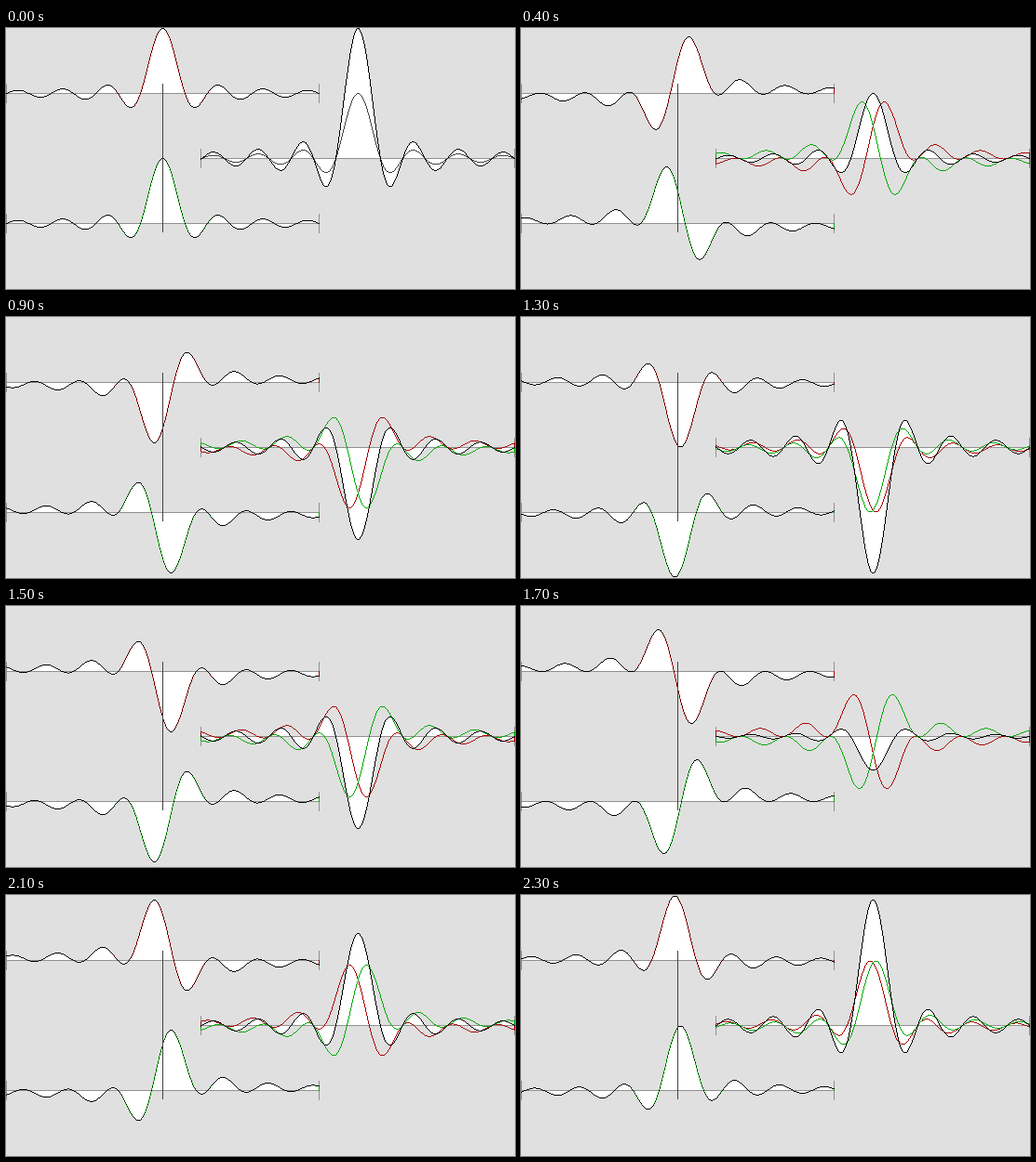
A matplotlib script for the animation above (2.4 s loop, 547 by 281 pixels).

```python
import numpy as np
import matplotlib.pyplot as plt
from matplotlib.animation import FuncAnimation
from matplotlib.collections import LineCollection

W, H, DPI = 547, 281, 64
FRAMES, INTERVAL = 24, 100
HALF, AMP = 168, 70
PIXEL = 72 / DPI

RED, GREEN, BLACK = "#aa0000", "#00aa00", "#000000"
MERGED = MARKER = "#404040"
AXIS = "#909090"

fig = plt.figure(figsize=(W / DPI, H / DPI), dpi=DPI, facecolor="#e0e0e0")
ax = fig.add_axes([0, 0, 1, 1])
ax.set_xlim(-0.5, W - 0.5)
ax.set_ylim(H - 0.5, -0.5)
ax.axis("off")

cols = np.arange(-1, 2 * HALF + 1)
u = 7 * np.pi * (cols - HALF) / HALF


def packet(phase):
    """Flat band of waves, all turned by the same phase."""
    even = np.sinc(u / np.pi)
    odd = np.sin(u / 2) * np.sinc(u / (2 * np.pi))
    return AMP * (np.cos(phase) * even + np.sin(phase) * odd)


def bars(x, a, b):
    """One-pixel-wide columns covering rows a to b inclusive."""
    x, a, b = np.broadcast_arrays(x, a, b)
    top, bottom = np.minimum(a, b) - 0.5, np.maximum(a, b) + 0.5
    return np.stack([np.column_stack([x, top]),
                     np.column_stack([x, bottom])], axis=1)


def layer(color, z):
    coll = LineCollection([], colors=color, linewidths=PIXEL, zorder=z,
                          antialiaseds=False, capstyle="butt")
    coll.set_snap(False)
    ax.add_collection(coll, autolim=False)
    return coll


class Panel:
    def __init__(self, x0, y0):
        self.x, self.y0 = cols + x0, y0
        self.body = layer("white", 1)
        left, right = max(x0 - 1, 0), x0 + 2 * HALF
        axis = layer(AXIS, 2)
        ticks = bars(np.array([left, right]), y0 - 10, y0 + 10)
        line = [[(left - 0.5, y0), (right + 0.5, y0)]]
        axis.set_segments(list(ticks) + line)

    def rows(self, wave):
        return self.y0 - np.round(wave)

    def fill(self, wave):
        self.body.set_segments(bars(self.x, self.y0, self.rows(wave)))

    def stroke(self, coll, wave):
        """Thin pixel line: neighbouring columns share out the rows between."""
        y = self.rows(wave)
        dy = np.diff(y)
        step, reach = np.sign(dy), np.abs(dy) // 2
        ends = y[:-1] + step * reach
        coll.set_segments(bars(self.x, np.r_[self.y0, ends + step],
                               np.r_[ends, self.y0]))

    def dots(self, coll, wave):
        y = self.rows(wave)
        coll.set_segments(bars(self.x, y, y))


upper, lower, total = Panel(0, 70), Panel(0, 210), Panel(210, 140)
sides = [(upper, layer(RED, 3), layer(BLACK, 4)),
         (lower, layer(GREEN, 3), layer(BLACK, 4))]
parts = [layer(RED, 3), layer(GREEN, 3.5)]
outline = layer(BLACK, 4)
layer(MARKER, 5).set_segments(bars(np.array([HALF]), 60, 219))


def update(i):
    phase = 2 * np.pi * i / FRAMES
    waves = [packet(phase), packet(-phase)]

    for (panel, edge, points), wave in zip(sides, waves):
        panel.fill(wave)
        panel.stroke(edge, wave)
        panel.dots(points, wave)

    for part, wave in zip(parts, waves):
        total.stroke(part, wave)
    parts[1].set_color(MERGED if i % (FRAMES // 2) == 0 else GREEN)

    total.fill(sum(waves))
    total.stroke(outline, sum(waves))
    return []


anim = FuncAnimation(fig, update, frames=FRAMES, interval=INTERVAL,
                     repeat=True, repeat_delay=0, blit=False)
plt.show()
```
